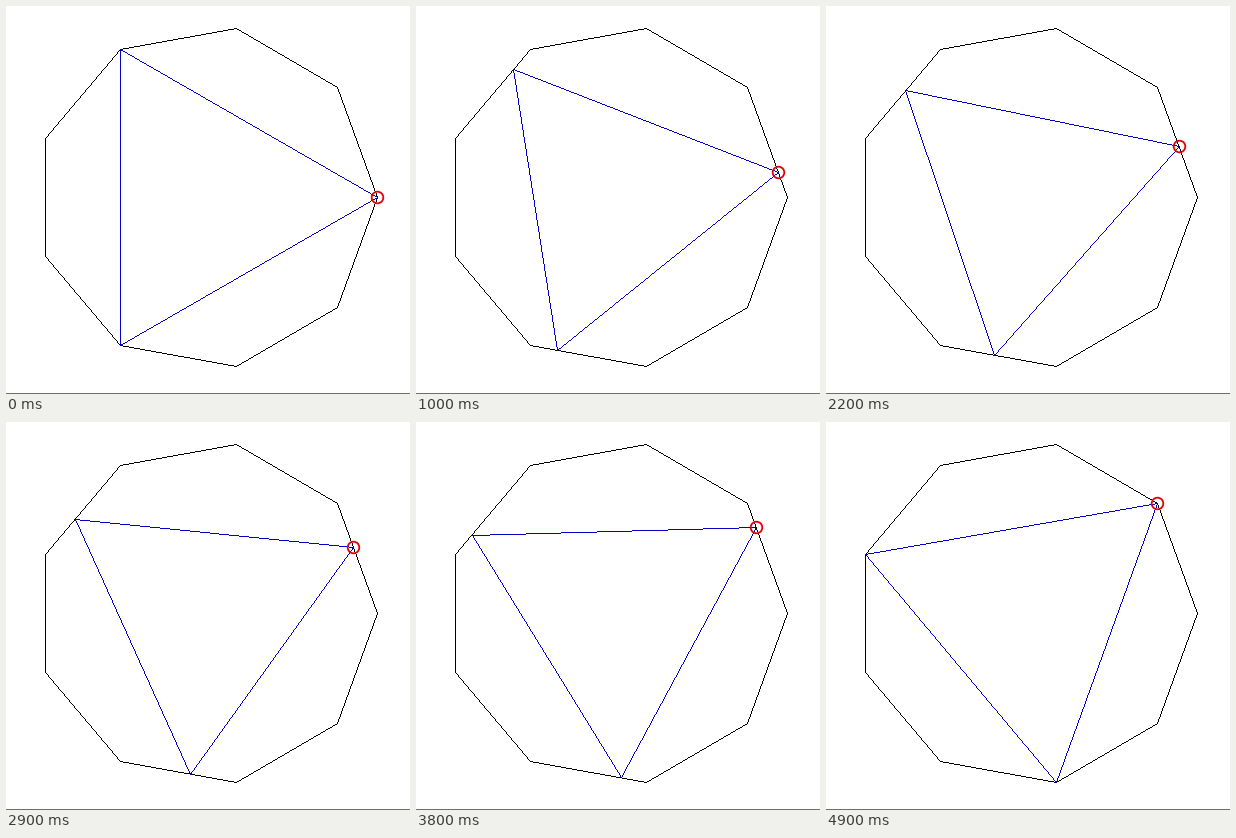
Animation, 404 px wide and 388 px high, one loop 5.1 s. Source, as a matplotlib script:

```python
import numpy as np
import matplotlib.pyplot as plt
from matplotlib.animation import FuncAnimation

W, H, DPI = 404, 388, 100
FRAMES, STEP_MS = 51, 100
LAST_STEP = 48
HEAD_START = 2.5  # the first move skips ahead by this many extra steps
CENTER, RADIUS = np.array([200, 191]), 171.2
BLACK, BLUE, GREY = (0, 0, 0), (0, 0, 200), (110, 110, 110)
RED = "#e00008"

angles = np.radians(40 * np.arange(10))
corners = CENTER + RADIUS * np.column_stack([np.cos(angles), -np.sin(angles)])


def progress(i):
    """Share of a nonagon side covered by the triangle's corners."""
    step = min(i - 1, LAST_STEP)
    if step <= 0:
        return 0
    return (step + HEAD_START) / (LAST_STEP + HEAD_START)


def triangle(part):
    """Closed triangle with its corners on every third side."""
    start, end = corners[[0, 3, 6, 0]], corners[[1, 4, 7, 1]]
    return start + part * (end - start)


def draw_path(canvas, points, color):
    """Draw a path one pixel wide, without smoothing."""
    points = np.round(points).astype(int)
    for a, b in zip(points, points[1:]):
        count = np.abs(b - a).max() + 1
        x, y = np.round(np.linspace(a, b, count)).astype(int).T
        canvas[y, x] = color


base = np.full((H, W, 3), 255, dtype=np.uint8)
draw_path(base, [(0, H - 1), (W - 1, H - 1)], GREY)
draw_path(base, corners, BLACK)

fig = plt.figure(figsize=(W / DPI, H / DPI), dpi=DPI, facecolor="white")
ax = fig.add_axes([0, 0, 1, 1])
ax.axis("off")
picture = ax.imshow(base, extent=(0, W, H, 0), aspect="auto",
                    interpolation="nearest")
ring = plt.Circle((0, 0), 5.8, fill=False, ec=RED, lw=1.8 * 72 / DPI)
ax.add_patch(ring)


def update(i):
    points = triangle(progress(i))
    canvas = base.copy()
    draw_path(canvas, points, BLUE)
    picture.set_data(canvas)
    ring.center = np.round(points[0]) + 0.5
    return picture, ring


anim = FuncAnimation(fig, update, frames=FRAMES, interval=STEP_MS,
                     repeat=True, repeat_delay=0, blit=False)
plt.show()
```
